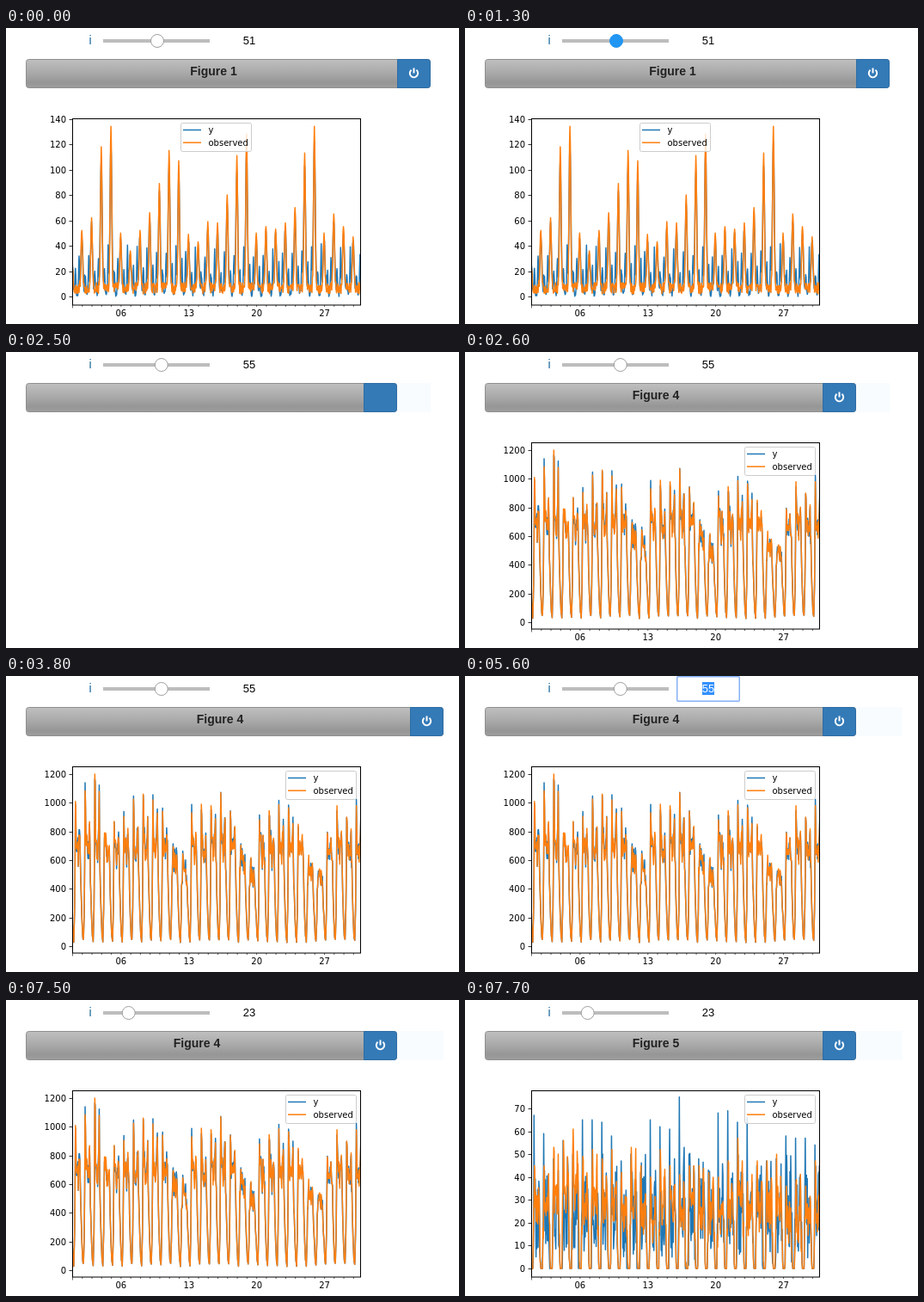
An HTML page with a canvas that plays this animation: 527 by 344 pixels, repeating every 8000 ms.

```html
<!DOCTYPE html>
<html lang="en">
<head>
<meta charset="utf-8">
<title>Interactive plot</title>
<style>
html, body { margin: 0; width: 100%; height: 100%; overflow: hidden; background: #fff; }
canvas { display: block; }
</style>
</head>
<body>
<canvas id="stage" width="527" height="344"></canvas>
<script>
const ctx = document.getElementById('stage').getContext('2d');
const LOOP = 8000, DAY = 11.27, LEFT = 77, TOP = 105, RIGHT = 412, BOTTOM = 322;
const BLUE = '#1f77b4', ORANGE = '#ff7f0e';
const SANS = '"Liberation Sans", Arial, sans-serif';
const PLOT_FONT = '10px "DejaVu Sans", sans-serif';

function random(seed) {
  return () => (seed = (seed * 16807) % 2147483647) / 2147483647;
}

// Piecewise linear curve through [x, y] points
function curve(points, x) {
  const k = Math.max(1, points.findIndex(p => p[0] >= x));
  const [x0, y0] = points[k - 1], [x1, y1] = points[k];
  return y0 + (y1 - y0) * (x - x0) / (x1 - x0);
}

// One [y, observed] pair per hour for thirty days
function hourly(seed, sample) {
  const rnd = random(seed), rows = [];
  for (let t = 0; t <= 720; t++) rows.push(sample(t, rnd));
  return rows;
}

const bell = (x, width) => Math.exp(-((x / width) ** 2));

const nightPeaks = [26, 52, 62, 118, 134, 50, 36, 52, 66, 89, 115, 107, 49, 43, 59, 58,
  80, 111, 128, 50, 55, 53, 58, 70, 113, 134, 50, 65, 55, 47, 40];
const workPeaks = [1010, 1085, 1200, 790, 870, 905, 1025, 1060, 1020, 940, 660, 590, 930, 990,
  980, 1070, 940, 660, 560, 880, 945, 985, 965, 850, 590, 540, 790, 980, 900, 980, 900];
const spikes = [67, 59, 48, 56, 50, 65, 65, 64, 58, 47, 50, 42, 65, 62, 61, 75, 50, 48, 43,
  68, 69, 64, 66, 45, 47, 48, 58, 57, 57, 54, 50];
const counts = [45, 45, 53, 56, 61, 49, 52, 48, 52, 42, 53, 45, 40, 52, 45, 41, 45, 45, 42,
  40, 47, 57, 38, 47, 47, 50, 36, 38, 36, 47, 47];

const plots = [
  { zero: 312, unit: 1.475, step: 20, max: 140, legend: 203,
    rows: hourly(17, (t, rnd) => {
      const d = Math.round(t / 24), off = t - 24 * d, peak = nightPeaks[d];
      const seen = (peak - 5) * bell(off, 2.7) + 2 + rnd() * 9 * (1 - bell(off, 1));
      const bumps = (26 + rnd() * 11) * bell(off + 7, 1.5) + (12 + rnd() * 14) * bell(off - 8, 1.5);
      return [peak * 0.88 * bell(off, 3.2) + bumps + rnd() * 5, seen + 3 * bell(off, 1)];
    }) },
  { zero: 314, unit: 1 / 6, step: 200, max: 1200, legend: 325,
    rows: hourly(29, (t, rnd) => {
      const d = Math.floor(t / 24), peak = workPeaks[d], rest = peak < 700;
      const mid = Math.min(peak * 0.85, 650), low = 25 + rnd() * 25;
      const v = curve([[0, 200], [2, 70], [4, low], [6, mid * 0.4], [7, mid * 0.85],
        [8, rest ? mid * 0.9 : peak], [9, rest ? mid : peak * 0.88], [10, rest ? peak : mid * 1.1],
        [12, mid * 1.08], [15, mid * 0.96], [17, mid * 1.1], [19, peak * 0.84],
        [20, mid], [22, mid * 0.6], [24, 200]], t % 24);
      const busy = v > 450 ? 1 : 0;
      const jitter = t % 24 === 8 ? 0 : (rnd() - 0.5) * 170 * busy;
      return [v + jitter * 0.8 + (rnd() - 0.45) * 110 * busy, v + jitter];
    }) },
  { zero: 312, unit: 2.657, step: 10, max: 70, legend: 325,
    rows: hourly(43, (t, rnd) => {
      const d = Math.floor(t / 24), h = t % 24;
      const shape = curve([[0, 0], [4, 0], [6, 0.45], [8, 1], [10, 0.6], [13, 0.5],
        [17, 0.6], [19, 0.85], [21, 0.4], [23, 0.06], [24, 0]], h);
      const noise = shape > 0.2 && h !== 8 ? 1 : 0;
      const seen = counts[d] * shape + (rnd() - 0.5) * 18 * noise;
      const guess = h === 7 ? spikes[d] : h === 8 ? spikes[d] * 0.5
        : 46 * shape + (rnd() - 0.55) * 36 * noise;
      return [Math.max(0, guess), Math.max(0, seen)];
    }) },
];

function text(str, x, y, font, color, align = 'center') {
  ctx.font = font;
  ctx.fillStyle = color;
  ctx.textAlign = align;
  ctx.fillText(str, x, y);
}

function line(points, color, width) {
  ctx.beginPath();
  points.forEach(([x, y]) => ctx.lineTo(x, y));
  ctx.strokeStyle = color;
  ctx.lineWidth = width;
  ctx.stroke();
}

function box(x, y, w, h, radii, fill, border, width = 1) {
  ctx.beginPath();
  ctx.roundRect(x, y, w, h, radii);
  ctx.fillStyle = fill;
  ctx.fill();
  ctx.strokeStyle = border;
  ctx.lineWidth = width;
  ctx.stroke();
}

function drawPlot({ zero, unit, step, max, legend, rows }, tint) {
  const ink = tint || '#000', colors = [tint || BLUE, tint || ORANGE];
  ctx.save();
  ctx.beginPath();
  ctx.rect(LEFT, TOP, RIGHT - LEFT, BOTTOM - TOP);
  ctx.clip();
  ctx.lineJoin = 'round';
  colors.forEach((color, k) =>
    line(rows.map((row, t) => [LEFT + t * DAY / 24, zero - row[k] * unit]), color, 1.5));
  ctx.restore();

  ctx.strokeStyle = ink;
  ctx.lineWidth = 1;
  ctx.strokeRect(LEFT + 0.5, TOP + 0.5, RIGHT - LEFT, BOTTOM - TOP - 0.5);
  for (let v = 0; v <= max; v += step) {
    const y = Math.round(zero - v * unit) + 0.5;
    line([[LEFT - 3.5, y], [LEFT, y]], ink, 0.8);
    text(v, 70, y + 3.5, PLOT_FONT, ink, 'right');
  }
  for (let d = 0; d < 30; d++) {
    const x = LEFT + 0.5 + d * DAY;
    line([[x, BOTTOM], [x, BOTTOM + (d ? 2 : 3.5)]], ink, 0.6);
    if (d % 7 === 5) text(String(d + 1).padStart(2, '0'), x, 335, PLOT_FONT, ink);
  }

  box(legend + 0.5, 110.5, 82, 33, 2, 'rgba(255,255,255,.8)', tint || '#ccc');
  ['y', 'observed'].forEach((name, k) => {
    const y = 118.5 + k * 14.7;
    line([[legend + 3, y], [legend + 24, y]], colors[k], 1.5);
    text(name, legend + 32.5, y + 3.5, PLOT_FONT, ink, 'left');
  });
}

function drawHeader({ right, trail, title, icon }) {
  if (trail > right) {
    ctx.fillStyle = '#f8fcff';
    ctx.fillRect(right, 36, trail - right, 34);
  }
  const shade = ctx.createLinearGradient(0, 36, 0, 70);
  [[0, '#c0c0c0'], [0.5, '#a8a8a8'], [0.8, '#969696'], [1, '#9e9e9e']]
    .forEach(stop => shade.addColorStop(...stop));
  box(23.5, 36.5, right - 24, 33, 3, shade, '#8f8f8f');
  if (title) text('Figure ' + title, (right - 11) / 2, 55, 'bold 14px ' + SANS, '#222');
  box(right - 38.5, 36.5, 38, 33, [0, 3, 3, 0], '#337ab7', '#2e6da4');
  if (!icon) return;
  const x = right - 19.5, y = 52.5;
  ctx.beginPath();
  ctx.arc(x, y, 4.7, -0.9, Math.PI + 0.9);
  ctx.strokeStyle = '#fff';
  ctx.lineWidth = 2;
  ctx.stroke();
  line([[x, y - 6], [x, y]], '#fff', 2);
}

function drawSlider({ at, knob, active, value, focus, select, caret }) {
  text('i', 98, 19, '14px ' + SANS, '#17669c');
  ctx.fillStyle = '#bdbdbd';
  ctx.fillRect(113, 13, 124, 4);
  ctx.beginPath();
  ctx.arc(176 + (at - 51) * 1.19, 15, knob, 0, 7);
  ctx.fillStyle = active ? '#2196f3' : '#fff';
  ctx.fill();
  ctx.strokeStyle = active ? '#2196f3' : '#9e9e9e';
  ctx.lineWidth = 1;
  ctx.stroke();

  if (focus) box(246.75, 0.75, 72.5, 28.5, 1, '#fff', '#86b1f5', 1.5);
  text(value, 283, 19, '13px ' + SANS, '#000');
  if (select) {
    ctx.save();
    ctx.beginPath();
    ctx.rect(290 - select, 7, select, 15);
    ctx.clip();
    ctx.fillStyle = '#3390ff';
    ctx.fillRect(276, 7, 14, 15);
    text(value, 283, 19, '13px ' + SANS, '#fff');
    ctx.restore();
  }
  if (caret) {
    ctx.fillStyle = '#000';
    ctx.fillRect(caret, 7, 1, 15);
  }
}

// Each step changes part of the state and holds until the next
const steps = [
  [0, { at: 51, value: '51', knob: 7.5, title: 1, right: 494, icon: true, plot: 0 }],
  [1300, { active: true }],
  [1700, { knob: 9.3, plot: null, ghost: true, title: 0 }],
  [1800, { right: 455, trail: 494 }],
  [1900, { at: 52, value: '52' }],
  [2000, { title: 2 }],
  [2100, { at: 53, value: '53' }],
  [2200, { at: 54, value: '54', title: 3 }],
  [2300, { at: 55, value: '55' }],
  [2500, { active: false, knob: 7.5, title: 0, icon: false, ghost: false }],
  [2600, { title: 4, icon: true, plot: 1 }],
  [2800, { right: 509 }],
  [2900, { right: 501, trail: 509 }],
  [3100, { right: 455 }],
  [3800, { right: 509 }],
  [4000, { right: 455 }],
  [4800, { focus: true, caret: 289 }],
  [5300, { caret: 0 }],
  [5400, { select: 7 }],
  [5600, { select: 14 }],
  [6700, { select: 0, value: '2', caret: 287 }],
  [6800, { value: '23', caret: 289 }],
  [7300, { caret: 0 }],
  [7500, { focus: false, at: 23 }],
  [7600, { plot: null, title: 0, icon: false }],
  [7700, { plot: 2, title: 5, icon: true }],
];

function frame(now) {
  const t = now % LOOP;
  const state = Object.assign({}, ...steps.filter(s => s[0] <= t).map(s => s[1]));
  ctx.fillStyle = '#fff';
  ctx.fillRect(0, 0, 527, 344);
  drawSlider(state);
  drawHeader(state);
  if (state.ghost) drawPlot(plots[0], '#f5faff');
  if (state.plot != null) drawPlot(plots[state.plot]);
  requestAnimationFrame(frame);
}
frame(0);
</script>
</body>
</html>
```
